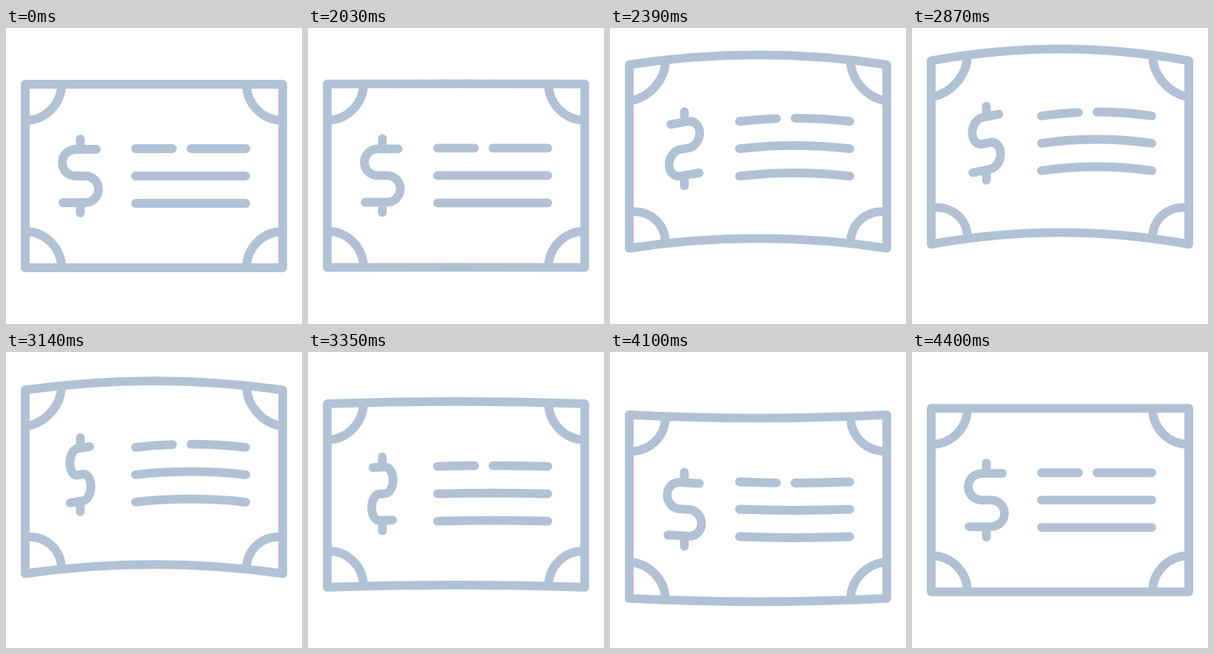
Recreate the animation shown at these times as an HTML page. Size 400 by 400 pixels, loop 4430 ms.

```html
<!DOCTYPE html>
<html lang="en">
<head>
<meta charset="utf-8">
<title>Waving banknote</title>
<style>
  html, body { margin: 0; width: 100%; height: 100%; overflow: hidden; background: #fff; }
  svg { display: block; width: 100%; height: 100%; }
</style>
</head>
<body>
<svg viewBox="0 0 400 400">
  <path id="note" fill="none" stroke="#b1c1d4" stroke-width="11.8"
        stroke-linecap="round" stroke-linejoin="round"/>
</svg>
<script>
const LOOP = 4430, START = 2030, STEP = 30;
const note = document.getElementById('note');
const clamp = v => Math.min(1, Math.max(0, v));
const span = (t, a, b) => clamp((t - a) / (b - a));

// Same curve as the CSS "ease" keyword
function ease(x) {
  let lo = 0, hi = 1;
  for (let i = 0; i < 24; i++) {
    const s = (lo + hi) / 2, r = 1 - s;
    if (0.75 * s * r * r + 0.75 * s * s * r + s ** 3 < x) lo = s; else hi = s;
  }
  const r = 1 - lo;
  return 0.3 * lo * r * r + 3 * lo * lo * r + lo ** 3;
}
const cubic = u => u < 0.5 ? 4 * u ** 3 : 1 - 4 * (1 - u) ** 3;

// Vertical shift at the middle of the note
const lift = t => -48 * ease(span(t, 2012, 2735))
  + 71 * cubic(span(t, 2735, 3925))
  - 23 * ease(span(t, 3990, 4425));

// Turns of the dollar sign: [time, turns, turns per ms]
const spin = [[2010, 0, .0011], [2390, .41, .00104], [2870, .893, .00098],
  [3350, 1.35, .00096], [3740, 1.725, .00088], [4400, 2, 0]];
function turns(t) {
  if (t <= spin[0][0]) return 0;
  const i = spin.findIndex(k => t < k[0]);
  if (i < 0) return 2;
  const [t0, p0, v0] = spin[i - 1], [t1, p1, v1] = spin[i];
  const d = t1 - t0, u = (t - t0) / d, r = 1 - u;
  return r * r * (1 + 2 * u) * p0 + u * u * (3 - 2 * u) * p1
    + u * r * d * (r * v0 - u * v1);
}

const pt = (x, y) => x.toFixed(2) + ' ' + y.toFixed(2) + ' ';

// Level line from x0 to x1, bent by the parabola f
function bent(x0, x1, y, f) {
  const mid = (x0 + x1) / 2, a = f(x0), b = f(x1);
  return 'M' + pt(x0, y + a) + 'Q' + pt(mid, y + 2 * f(mid) - (a + b) / 2) + pt(x1, y + b);
}

function frame(m) {
  const f = x => m * (1 - ((x - 200) / 174) ** 2 / 3);
  let d = '';
  for (const y of [76, 324]) d += bent(26, 374, y, f);
  for (const x of [26, 374]) d += 'M' + pt(x, 76 + f(x)) + 'L' + pt(x, 324 + f(x));
  for (const [x, sx] of [[26, 1], [374, -1]])
    for (const [y, sy] of [[76, 1], [324, -1]]) {
      const p = (a, b) => pt(x + sx * a, y + sy * b + f(x + sx * a));
      d += 'M' + p(49, 0) + 'C' + p(49, 27) + p(27, 49) + p(0, 49);
    }
  return d;
}

function lines(m) {
  const f = x => m * (1.04 - 0.11 * ((x - 249.5) / 74.5) ** 2);
  return bent(175, 225, 163, f) + bent(250, 324, 163, f)
    + bent(175, 324, 200, f) + bent(175, 324, 237, f);
}

function dollar(m, s) {
  const p = (x, y) => {
    const dx = (x - 100.5) * s;
    return pt(100.5 + dx, y + m * (0.93 + 0.0042 * dx));
  };
  const k = 18 * 0.5523;
  // Half circle of radius 18, from (x, y) down to (x, y + 36)
  const lobe = (x, y, r) => 'C' + p(x + r * k, y) + p(x + r * 18, y + 18 - k) + p(x + r * 18, y + 18)
    + 'C' + p(x + r * 18, y + 18 + k) + p(x + r * k, y + 36) + p(x, y + 36);
  return 'M' + p(122, 164) + 'L' + p(94, 164) + lobe(94, 164, -1)
    + 'L' + p(107, 200) + lobe(107, 200, 1) + 'L' + p(77, 236)
    + 'M' + p(100.5, 150) + 'L' + p(100.5, 164)
    + 'M' + p(100.5, 236) + 'L' + p(100.5, 250);
}

function draw(t) {
  t = t < START ? 0 : START + Math.floor((t - START) / STEP) * STEP;
  const m = lift(t);
  note.setAttribute('d', frame(m) + lines(m) + dollar(m, Math.cos(turns(t) * 2 * Math.PI)));
}

const begin = performance.now();
function tick() {
  draw((performance.now() - begin) % LOOP);
  requestAnimationFrame(tick);
}
tick();
</script>
</body>
</html>
```
